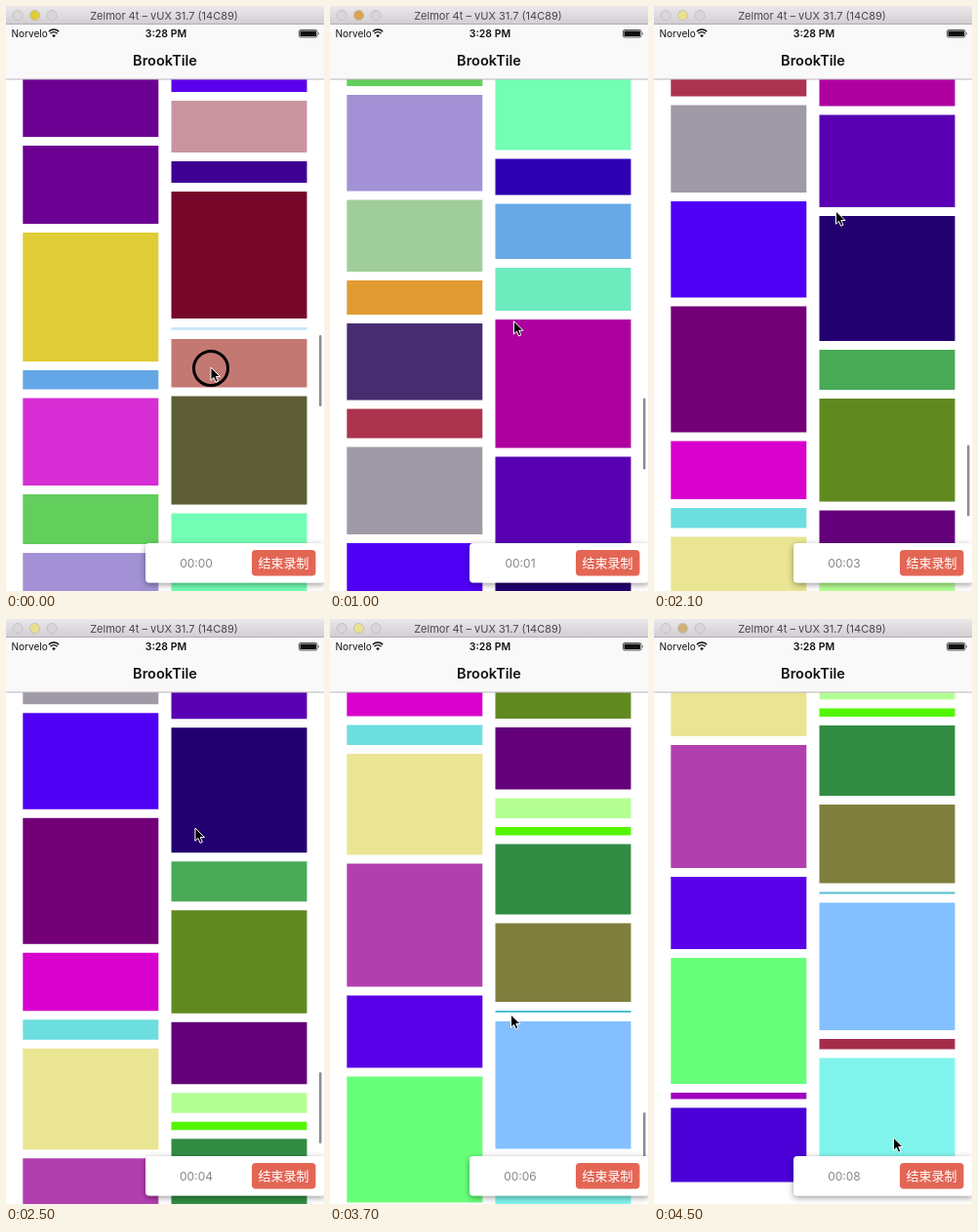
These frames come from a looping animation (326x599 px, 4600 ms). An HTML page:

```html
<!DOCTYPE html>
<html lang="en">
<head>
<meta charset="utf-8">
<title>Two-column scroll</title>
<style>
  html, body { margin: 0; width: 100%; height: 100%; overflow: hidden; background: #fff; }
  svg { display: block; width: 326px; height: 599px; font-family: Inter, Roboto, sans-serif; }
  .cjk { font-family: "Noto Sans CJK SC", "Noto Sans CJK", "Noto Sans CJK JP", sans-serif; }
</style>
</head>
<body>
<svg viewBox="0 0 326 599" xmlns="http://www.w3.org/2000/svg">
  <defs>
    <linearGradient id="barFill" x2="0" y2="1">
      <stop stop-color="#ebe8eb"/><stop offset="1" stop-color="#d2cfd2"/>
    </linearGradient>
    <filter id="shadow" x="-10%" y="-30%" width="120%" height="170%">
      <feDropShadow dx="0" dy="2" stdDeviation="3" flood-color="#000" flood-opacity=".4"/>
    </filter>
  </defs>
  <rect width="326" height="599" fill="#fff"/>
  <g id="tiles"></g>
  <rect id="indicator" x="321" width="2.5" height="73" rx="1.25" fill="#8d8b96"/>

  <rect y="18" width="326" height="57" fill="#faf9fa"/>
  <rect y="74.5" width="326" height="1" fill="#b9b6ba"/>
  <rect width="326" height="18" fill="url(#barFill)"/>
  <rect y="18" width="326" height="1" fill="#b5a9b5"/>
  <g fill="#d9d6d9" stroke="#bdb8bd" stroke-width=".8">
    <circle cx="12" cy="9.5" r="5"/>
    <circle id="light" cx="29.5" cy="9.5" r="5"/>
    <circle cx="47" cy="9.5" r="5"/>
  </g>
  <text x="162" y="13.5" font-size="11" text-anchor="middle" fill="#4b454b">Zelmor 4t – vUX 31.7 (14C89)</text>

  <g fill="#111">
    <text x="5.5" y="32" font-size="10">Norvelo</text>
    <text x="164" y="32" font-size="10.5" font-weight="600" text-anchor="middle">3:28 PM</text>
    <text x="163" y="61" font-size="14.5" font-weight="600" text-anchor="middle">BrookTile</text>
    <path d="M49 32.2l-1.8-2a2.6 2.6 0 0 1 3.6 0z"/>
    <path d="M45.5 28.2a5 5 0 0 1 7 0M43.8 26.2a7.3 7.3 0 0 1 10.4 0" fill="none" stroke="#111" stroke-width="1.4"/>
    <rect x="300.5" y="24.5" width="18.5" height="7.5" rx="1.5" fill="none" stroke="#111" stroke-width=".7"/>
    <rect x="301.5" y="25.5" width="16.5" height="5.5" rx=".5"/>
    <path d="M320 26.8q1.5 1.4 0 2.9z"/>
  </g>

  <rect x="143" y="550" width="184" height="40.5" rx="4" fill="#fff" filter="url(#shadow)"/>
  <text id="timer" x="195" y="574.5" font-size="12" text-anchor="middle" fill="#8b838b"></text>
  <rect x="252" y="557" width="65.5" height="26.5" rx="4" fill="#e36655"/>
  <text class="cjk" x="284.5" y="575" font-size="13" font-weight="500" text-anchor="middle" fill="#fff">结束录制</text>

  <g id="cursor">
    <circle id="ring" r="17.5" cx="0" cy="1" fill="none" stroke="#000" stroke-width="3"/>
    <path d="M0 0v13.2l3-2.8 2.1 4.8 2.3-1-2.1-4.7h4.2z" fill="#000" stroke="#fff" stroke-width="1"/>
  </g>
</svg>
<script>
const LOOP = 4600, STEP = 100, GAP = 9, TOP = 20;
const $ = id => document.getElementById(id);

// Each tile: colour and height, stacked downwards.
const columns = [
  { x: 17.3, tiles: `6c0092 114,6c0092 80,dfcc36 132,64a7e6 19.5,d72dd4 89.5,62ce5c 51,a291d4 98.5,
    a0ce9b 73.5,e19b32 35,472d70 78.5,ac334e 30,9f9aa5 89.5,5000f5 98.5,730077 129,d800cd 59.5,
    6ddedf 20.5,e9e592 103.5,b23fae 126,5a00e8 74,67ff79 129,a000bd 6.5,4a00d6 76` },
  { x: 169.5, tiles: `5b00ea 68,c994a0 53,3d0092 22,770729 130,c9e8f8 3,c47872 49.5,5d5d35 111,
    72feb4 97,2d00b2 37,67a9e7 56.5,6eeabf 44,ae009f 131.5,5800b2 94.5,23006f 128,48aa57 41,
    608a1f 105.5,63007a 63.5,b4ff93 20.5,53f600 8.5,318c43 72,807e3d 80.5,53bfd0 2,
    84c0ff 130.5,a52d49 10.5,80f4ec 129.5` }
];

function addTile(x, y, height, fill) {
  const rect = document.createElementNS('http://www.w3.org/2000/svg', 'rect');
  const attrs = { x, y, width: 139, height, fill };
  for (const name in attrs) rect.setAttribute(name, attrs[name]);
  $('tiles').append(rect);
}

for (const { x, tiles } of columns) {
  let y = TOP;
  for (const tile of tiles.split(',')) {
    const [colour, height] = tile.trim().split(' ');
    addTile(x, y, +height, '#' + colour);
    y += +height + GAP;
  }
}

const times = [0, 600, 1400, 2100, 3000, 3700, 4500];
const scrolls = [0, 305.3, 612, 819, 1047, 1224.5, 1346];
const cursorX = [210, 194.5, 185.5, 186.5, 203.5, 185.5, 245.5];
const cursorY = [370, 353, 282, 210, 229, 405, 531];
const lights = ['#dfcd36', '#dba24f', '#e09b31', '#e9e28d', '#e9e28d', '#e9e28d', '#cdb27a'];

// Monotone cubic curve through (times[i], values[i]).
function curve(values) {
  const slopes = values.slice(1).map((v, i) => (v - values[i]) / (times[i + 1] - times[i]));
  const tangents = values.map((_, i) => {
    const a = slopes[i - 1] ?? slopes[i], b = slopes[i] ?? a;
    return a * b > 0 ? 2 * a * b / (a + b) : 0;
  });
  return t => {
    let i = times.length - 2;
    while (i > 0 && t < times[i]) i--;
    const span = times[i + 1] - times[i], u = (t - times[i]) / span, w = 1 - u;
    return w * w * (1 + 2 * u) * values[i] + u * u * (3 - 2 * u) * values[i + 1]
      + span * u * w * (w * tangents[i] - u * tangents[i + 1]);
  };
}

const scrollAt = curve(scrolls), xAt = curve(cursorX), yAt = curve(cursorY);

function nearestKey(t) {
  return times.reduce((best, time, i) =>
    Math.abs(time - t) < Math.abs(times[best] - t) ? i : best, 0);
}

function draw(t) {
  const scroll = scrollAt(t);
  const seconds = Math.max(0, Math.floor(t * 0.00185 - 0.2));
  $('tiles').setAttribute('transform', `translate(0 ${-scroll})`);
  $('indicator').setAttribute('y', 337 + scroll * 0.1375);
  $('indicator').setAttribute('opacity', Math.min(1, Math.max(0, (4500 - t) / 300)));
  $('cursor').setAttribute('transform', `translate(${xAt(t)} ${yAt(t)})`);
  $('ring').setAttribute('visibility', t < 200 ? 'visible' : 'hidden');
  $('light').setAttribute('fill', lights[nearestKey(t)]);
  $('timer').textContent = '00:0' + seconds;
}

const start = performance.now();
function tick() {
  const elapsed = (performance.now() - start) % LOOP;
  draw(Math.floor(elapsed / STEP) * STEP);
  requestAnimationFrame(tick);
}
tick();
</script>
</body>
</html>
```
